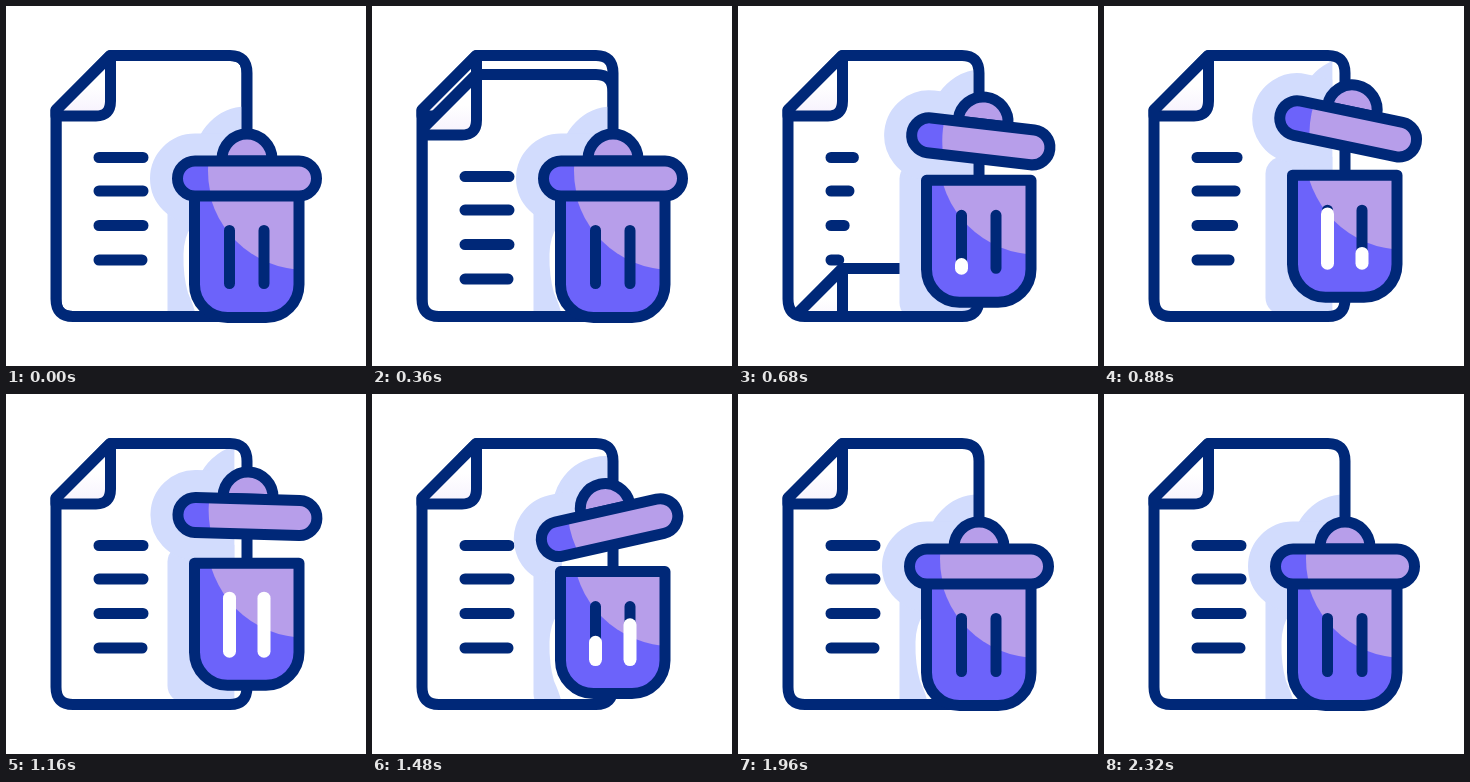
Animation, 360 px wide and 360 px high, one loop 2400 ms. Source, as an HTML page:

```html
<!DOCTYPE html>
<html lang="en">
<head>
<meta charset="utf-8">
<title>Delete document</title>
<style>
  html, body { margin: 0; width: 100%; height: 100%; overflow: hidden; background: #fff; }
  svg { display: block; width: 100vw; height: 100vh; }
  .ink { fill: none; stroke: #002878; stroke-width: 11; stroke-linecap: round; stroke-linejoin: round; }
  .shadow { fill: #d2dcfd; }
  .halo { stroke: #d2dcfd; stroke-width: 55; stroke-linejoin: round; }
  .blue { fill: #6c63fa; }
  .lilac { fill: #b79eea; }
  .white { stroke: #fff; stroke-width: 13; }
</style>
</head>
<body>
<svg viewBox="0 0 360 360">
  <defs>
    <linearGradient id="tint" x1="0" y1="0" x2="0" y2="1">
      <stop offset=".5" stop-color="#fff"/>
      <stop offset="1" stop-color="#f6f1fd"/>
    </linearGradient>
    <path id="page" d="M50 104L104 49.5H224Q241 49.5 241 67V293Q241 310.5 224 310.5H67Q50 310.5 50 293Z"/>
    <path id="fold" d="M50 104L104.5 49.5V95Q104.5 110 90 110H50Z"/>
    <path id="body" d="M188.5 189.5H293V278.5A33 33 0 0 1 260 311.5H221.5A33 33 0 0 1 188.5 278.5Z"/>
    <path id="dome" d="M216 155V153A25 25 0 0 1 266 153V155Z"/>
    <rect id="lid" x="171.5" y="155" width="139" height="35" rx="17.5"/>
    <clipPath id="inPage"><use href="#page"/></clipPath>
    <clipPath id="inBody"><use href="#body"/></clipPath>
    <clipPath id="inLid"><use href="#lid"/></clipPath>
    <clipPath id="reach"><rect id="edge" width="240" height="360"/></clipPath>
  </defs>

  <use href="#fold" fill="url(#tint)"/>
  <use href="#fold" class="ink"/>
  <path id="newLines" class="ink"/>

  <g clip-path="url(#inPage)">
    <g id="oldPage">
      <use href="#page" fill="#fff"/>
      <use href="#fold" fill="url(#tint)"/>
      <use href="#fold" class="ink"/>
      <use href="#page" class="ink"/>
      <path id="oldLines" class="ink"/>
    </g>
    <g class="shadow" clip-path="url(#reach)">
      <rect x="161.5" y="171" width="130" height="158" rx="17" data-move="body"/>
      <g class="halo" data-move="lid"><use href="#dome"/><use href="#lid"/></g>
    </g>
    <path id="gap" fill="#fff" d="M190 168L241 150V306H189Q187 298 182 287Q177 270 177.500 248Q178 230 186 220Z"/>
  </g>
  <use href="#page" class="ink"/>

  <g data-move="body">
    <use href="#body" class="blue"/>
    <circle cx="300" cy="165" r="99" class="lilac" clip-path="url(#inBody)"/>
    <use href="#body" class="ink"/>
    <path class="ink" d="M223.500 224.500V277.500M258 224.500V277.500"/>
    <path id="fillLeft" class="ink white"/>
    <path id="fillRight" class="ink white"/>
  </g>
  <g data-move="lid">
    <use href="#dome" class="lilac"/>
    <use href="#dome" class="ink"/>
    <use href="#lid" class="blue"/>
    <circle cx="300" cy="165" r="98" class="lilac" clip-path="url(#inLid)"/>
    <use href="#lid" class="ink"/>
  </g>
</svg>
<script>
const LOOP = 2400;
const $ = id => document.getElementById(id);
const set = (id, name, value) => $(id).setAttribute(name, value);
const place = (part, transform) => document.querySelectorAll(`[data-move=${part}]`)
  .forEach(el => el.setAttribute("transform", transform));

// Progress from 0 to 1 between two times: steady, eased at both ends, eased at the end
const ramp = (t, from, to) => Math.min(1, Math.max(0, (t - from) / (to - from)));
function ease(t, from, to) {
  const p = ramp(t, from, to);
  return p < .5 ? 2 * p * p : 1 - 2 * (1 - p) ** 2;
}
const easeOut = (t, from, to) => 1 - (1 - ramp(t, from, to)) ** 2;

const textLines = grow => [151.5, 185, 219.5, 254]
  .map((y, i) => grow(i) > 0 ? `M93 ${y}H${93 + (i == 3 ? 43 : 44) * grow(i)}` : "").join("");

function fillBar(id, x, level) {
  set(id, "d", level > 0 ? `M${x} 277.500V${277.5 - 53 * level}` : "");
}

function draw(t) {
  set("oldPage", "transform", `translate(0 ${262 * ease(t, 240, 875)})`);
  set("newLines", "d", textLines(i => easeOut(t, 532 + 34 * i, 1030 + 34 * i)));

  const bodyY = -20.3 * (ease(t, 487, 787) - ease(t, 1336, 1656));
  const lidY = -50 * (ease(t, 488, 788) - ease(t, 1376, 1696));
  const tilt = 11.8 * ease(t, 465, 870) - 24.6 * ease(t, 870, 1510) + 12.8 * ease(t, 1510, 1740);
  place("body", `translate(0 ${bodyY})`);
  place("lid", `translate(0 ${lidY}) rotate(${tilt} 241 188)`);

  set("edge", "width", 240 + Math.min(0, bodyY + 12) * 1.4);
  set("gap", "visibility", bodyY > -14 ? "visible" : "hidden");

  fillBar("fillLeft", 223.5, ease(t, 621, 941) - ease(t, 1242, 1642));
  fillBar("fillRight", 258, ease(t, 784, 1104) - ease(t, 1315, 1715));
}

set("oldLines", "d", textLines(() => 1));
const start = performance.now();
function frame() {
  draw((performance.now() - start) % LOOP);
  requestAnimationFrame(frame);
}
frame();
</script>
</body>
</html>
```
